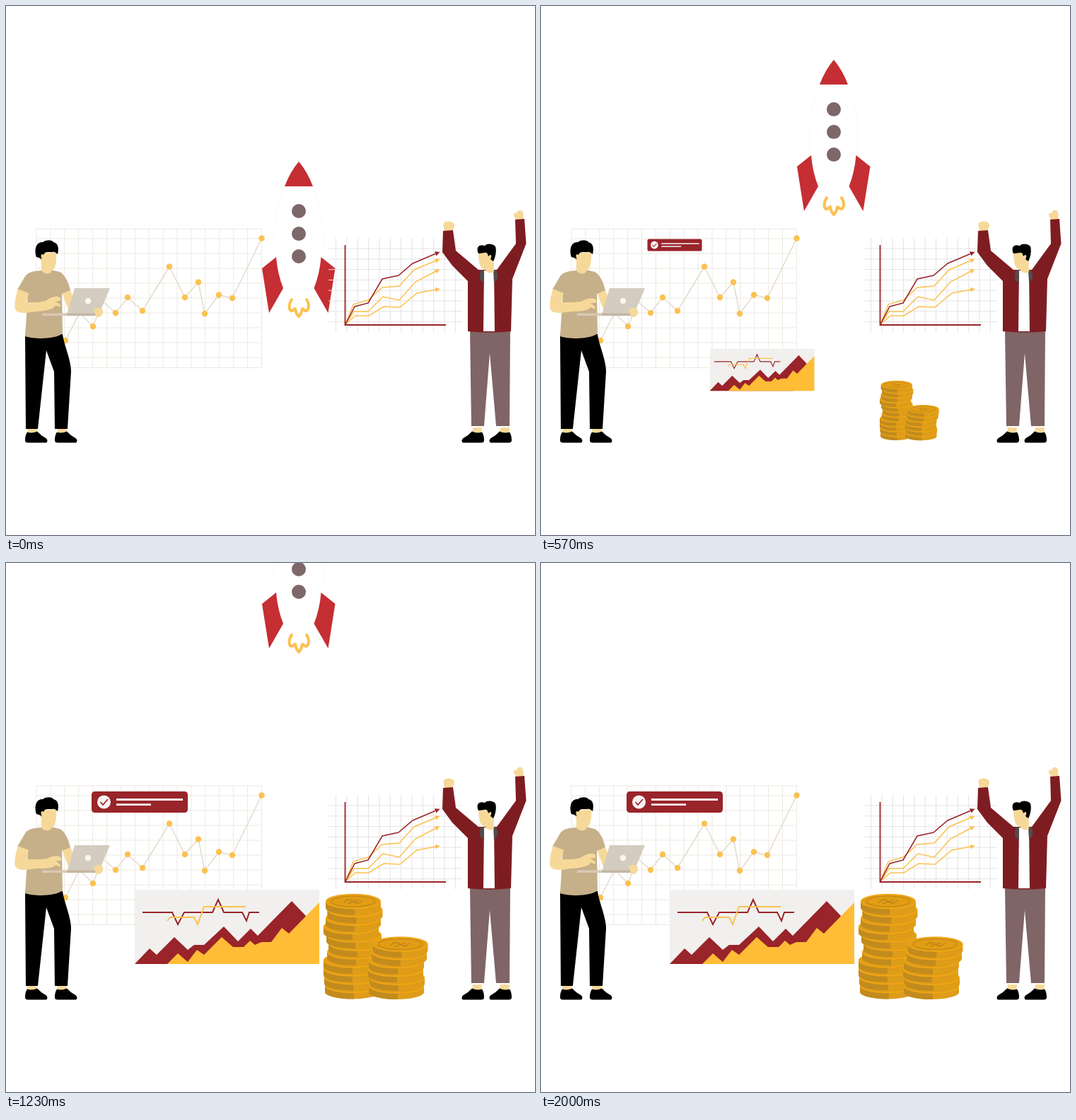
Animation, 748 px wide and 748 px high, one loop 2030 ms. Source, as an HTML page:

```html
<!DOCTYPE html>
<html lang="en">
<head>
<meta charset="utf-8">
<title>Growth</title>
<style>
html, body { margin: 0; width: 100%; height: 100%; overflow: hidden; background: #fff; }
svg { display: block; width: 100vw; height: 100vh; }
.line { fill: none; }
.skin { fill: #f6d999; }
.red { fill: #99242a; }
.gold { fill: #fcc150; }
</style>
</head>
<body>
<svg viewBox="0 0 748 748">
  <defs>
    <marker id="redTip" markerUnits="userSpaceOnUse" markerWidth="8" markerHeight="8" refX="1" refY="3.5" orient="auto"><path class="red" d="M0 0L7 3.5L0 7Z"/></marker>
    <marker id="goldTip" markerUnits="userSpaceOnUse" markerWidth="8" markerHeight="8" refX="1" refY="3.5" orient="auto"><path class="gold" d="M0 0L7 3.5L0 7Z"/></marker>
    <g id="foot">
      <path class="skin" d="M30 596H43L44 605H31Z"/>
      <path d="M30 602.5Q37 605 44 601.500Q50 608 57 611.500Q60 615 57 617.500H31Q27 617.500 27 614Q27 607 30 602.500Z"/>
    </g>
  </defs>

  <g id="rocket">
    <path d="M394 255C374 305 375 355 392 400H436C453 355 453 305 434 255Z" fill="#fff" stroke="#f7f7f7" stroke-width=".7"/>
    <path d="M414 220Q426 234 434 255H394Q402 234 414 220ZM382 355L362 371L372 434L392 399Q384 379 382 355ZM445.500 355L465.500 371L455.500 434L435.500 399Q443.500 379 445.500 355Z" fill="#c52e33"/>
    <g fill="#7e6769"><circle cx="414" cy="290" r="10"/><circle cx="414" cy="322" r="10"/><circle cx="414" cy="354" r="10"/></g>
    <path class="line" d="M404 415C400 421 399 428 403 431C406 432 407 428 409 428Q410 435 414 439Q418 435 419 428C421 428 422 432 425 431C429 428 429 421 425 415" stroke="#fcc150" stroke-width="4" stroke-linecap="round" stroke-linejoin="round"/>
  </g>

  <path id="wideGrid" class="line" stroke="#ece9e0"/>
  <path id="trend" class="line" stroke="#e3dacd" stroke-width="1.5"/>
  <g id="dots" class="gold"></g>

  <path id="smallGrid" class="line" stroke="#e5e3e3"/>
  <g class="line" stroke="#fcc150" stroke-width="1.500" marker-end="url(#goldTip)">
    <path marker-end="url(#goldTip)" d="M480 450L491 422L512 416L532 398L556 396L577 373L608 360"/>
    <path marker-end="url(#goldTip)" d="M480 450L492 432H512L533 411L556 416L579 390L608 375"/>
    <path marker-end="url(#goldTip)" d="M480 450L494 438H513L534 425L557 426L581 406L608 401"/>
  </g>
  <g class="line" stroke="#99242a">
    <path stroke-width="1.500" marker-end="url(#redTip)" d="M480 450L493 425L512 420L532 386L555 381L575 364L608 350"/>
    <path stroke-width="1.800" d="M479.500 338V451H622"/>
  </g>

  <g id="badge">
    <rect class="red" x="121" y="323" width="136" height="30" rx="4.500"/>
    <circle cx="138.500" cy="338" r="9.500" fill="#f8f3f3"/>
    <path class="line" d="M133.500 338L137 342L144 334" stroke="#99242a" stroke-width="1.800"/>
    <path d="M156 333H250V336H156ZM156 340.300H205V343H156Z" fill="#f8f3f3"/>
  </g>

  <g id="area">
    <path d="M182 462H443V567H182Z" fill="#f1f0ee"/>
    <path class="red" d="M182 567L203 545L213 554L238 529L257 547L266 540H280L308 514L328 535L346 517L356 527L404 478L424 499L390 567Z"/>
    <path d="M228 567L243 552L257 564L270 547L280 554L305 529L321 543H336L345 534L352 540L361 536H375L390 516L400 524L443 480V567Z" fill="#ffbc36"/>
    <g class="line" stroke-width="2">
      <path d="M193 494H235L243 511L252 494H292L300 476L308 494H334L340 506L344 494H358" stroke="#99242a"/>
      <path d="M228 506L232 501H266L271 511L280 486H339" stroke="#fcc150"/>
    </g>
  </g>

  <g id="coins"></g>

  <g id="worker">
    <path class="skin" d="M79 405L90 400L97 416L128 428C135 425 138 430 137 434C136 438 131 441 126 438L88 429Z"/>
    <use href="#foot"/><use href="#foot" x="42"/>
    <path d="M27 464H80C82 480 92 500 92 517L87 598H69L68 517L57 487L45 598H28Z"/>
    <path d="M50 374C38 375 30 376 26 384L16 401L31 406L27 467C40 471 68 472 80 463L79 407L91 402C88 390 83 379 76 376L64 373Z" fill="#c6b08a"/>
    <path class="skin" d="M50 350L71 348C72 360 70 373 65 373L64 376C61 380 53 379 50 374V360C45 358 46 350 50 350Z"/>
    <path d="M43 355C39 342 44 333 52 334C57 330 66 331 67 334C74 335 75 343 73 351C71 350 70 347 65 348C58 348 55 347 53 352C50 349 48 353 51 358L47 356Z"/>
    <path d="M97 399H147L131 437H86Z" fill="#d4ccc0"/>
    <circle cx="116" cy="417" r="4.300" fill="#f8f6f1"/>
    <path d="M51 434.500H128V438H51Z" fill="#d8c9b4"/>
    <path d="M86 434.500H129L127 438H86Z" fill="#c5b7a5"/>
    <path class="skin" d="M124 429C130 425 138 427 137 434C136 439 130 442 126 438C128 436 124 432 124 429Z"/>
    <path class="skin" d="M17 400L32 406L29 419L49 419V431L28 434C20 434 13 433 12.500 426C12 418 14 409 17 400Z"/>
    <path id="hand" class="skin" d="M45 419L56 417C61 413 69 410 74 411C78 413 79 416 75 417L69 418C72 419 78 422 77 425C74 426 70 422 69 425C66 429 55 431 45 432Z"/>
  </g>

  <g>
    <use href="#foot" transform="matrix(-1 0 0 1 703 0)"/>
    <use href="#foot" transform="matrix(-1 0 0 1 742 0)"/>
    <path d="M656 458H713L712 594H693L684 491L676 594H658Z" fill="#806566"/>
    <path class="skin" d="M620 319L619 312C617 307 621 304 626 304.500C631 304 635 308 634 311L631 319ZM721 304C721 299 717 298 718 292.500C721 295 722 292 724 289.500C730 287 733 291 731 303Z"/>
    <path d="M618 318L632 317L636 346L668 373H694L721 336L720 302L733 301L735.500 336L716 386L714 460Q684 463 653 460V389L631 367L617 348Z" fill="#7e1d21"/>
    <path d="M676 374H690L691 460H675Z" fill="#fff"/>
    <path d="M671 374L676 373V391Q669 390 670 380ZM689 372L694 375Q698 386 690 391Z" fill="#514b4d"/>
    <path class="skin" d="M668 347H689L690 375C687 379 680 378 678 373C671 373 668 364 668 347Z"/>
    <path d="M668 350C664 341 669 336 677 339C680 335 689 336 692 340C694 346 692 356 689 361L685 358C688 352 685 350 682 354C681 351 681 348 676 349Z"/>
  </g>
</svg>
<script>
const $ = id => document.getElementById(id);
const steps = (from, gap, count) => Array.from({ length: count }, (_, i) => from + gap * i);

function grid(id, xs, ys, [left, top, right, bottom]) {
  $(id).setAttribute("d",
    xs.map(x => `M${x} ${top}V${bottom}`).join("") +
    ys.map(y => `M${left} ${y}H${right}`).join(""));
}
grid("wideGrid", steps(43, 19.9, 17), [315, ...steps(329, 21, 9), 511.5], [43, 315, 361.5, 511.5]);
grid("smallGrid", steps(466.5, 15.35, 12), steps(343, 14.8, 8), [456, 328, 645, 461]);

// Points without a dot are hidden behind the laptop.
const points = [[84, 473], [104, 434, 1], [123, 453], [137, 418, 1], [155, 434], [172, 412], [193, 431],
  [231, 368.5], [253, 412], [272, 390.5], [281, 435], [301, 408.5], [320, 413], [361.5, 328.5]];
$("trend").setAttribute("d", "M" + points.map(([x, y]) => x + " " + y).join("L"));
$("dots").innerHTML = points.filter(p => !p[2])
  .map(([x, y]) => `<circle cx="${x}" cy="${y}" r="4.2"/>`).join("");

function coin(x, y, rx) {
  const ry = 10, low = y + 9, mid = x + 2;
  return `<path d="M${x - rx} ${y}V${low}A${rx} ${ry} 0 0 0 ${x + rx} ${low}V${y}Z" fill="#de9c19"/>
    <path d="M${x - rx} ${y}V${low}A${rx} ${ry} 0 0 0 ${mid} ${low + ry}V${y}Z" fill="#c28b1e"/>
    <ellipse cx="${x}" cy="${y}" rx="${rx - .6}" ry="${ry}" fill="#e29d14" stroke="#f2a916" stroke-width="1.4"/>`;
}
function stack(centers, top, gap, rx) {
  const [x] = centers;
  return centers.map((cx, i) => coin(cx, top + gap * i, rx)).reverse().join("") +
    `<g class="line" stroke="#bd861b"><ellipse cx="${x}" cy="${top}" rx="31" ry="7.5" stroke-width="1.2"/>
    <path d="M${x - 13} ${top + 2}c3 -6 10 -5 13 -2s10 4 13 -2M${x - 8} ${top + 3}l16 -5" stroke-width="1.6"/></g>`;
}
$("coins").innerHTML =
  stack([491, 493.5, 491, 488, 492, 495, 493, 488, 488, 489, 490], 478.5, 11.9, 39) +
  stack([557.5, 556, 552, 551, 553, 552], 539, 11.8, 39);

const grow = (id, x, y, s) =>
  $(id).setAttribute("transform", `translate(${x} ${y}) scale(${s}) translate(${-x} ${-y})`);

function draw(now) {
  // Thirty steps a second, each starting on a whole hundredth.
  const t = Math.floor((now % 2030) / 10) * 10;
  const n = Math.floor((t + 5) * .03);
  const size = Math.min(1, n / 30);
  $("rocket").setAttribute("transform", `translate(0 ${-8.467 * n})`);
  grow("badge", 189, 338, size);
  grow("area", 312.6, 514.5, size);
  grow("coins", 518.3, 610.7, size);
  $("hand").setAttribute("transform", `rotate(${4.5 * (1 - Math.cos(Math.PI * n / 30))} 46 425)`);
}
const start = performance.now();
function loop() {
  draw(performance.now() - start);
  requestAnimationFrame(loop);
}
loop();
</script>
</body>
</html>
```
